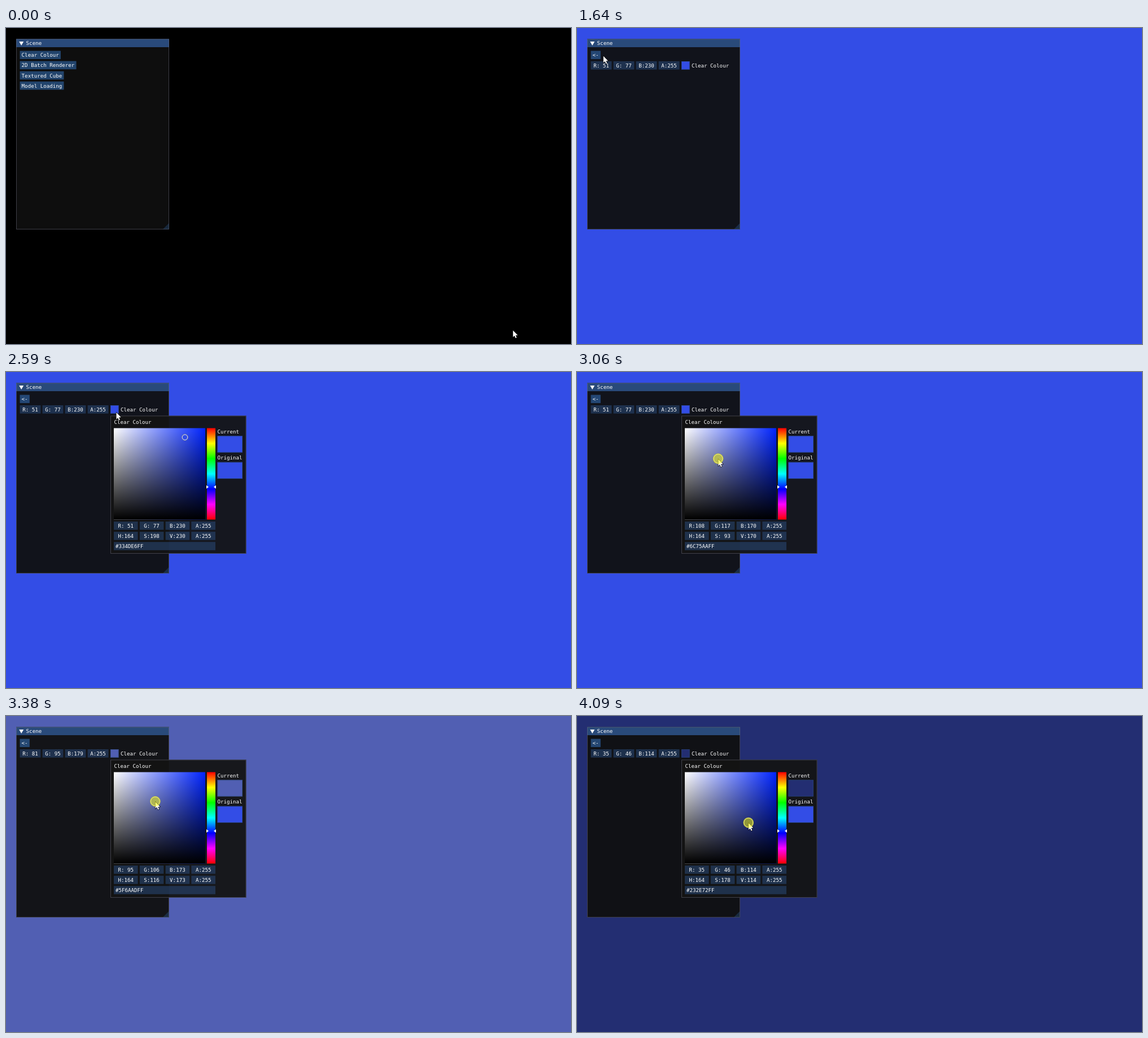
Recreate the animation shown at these times as an HTML page with a canvas. Size 1001 by 560 pixels, loop 4170 ms.

```html
<!DOCTYPE html>
<html>
<head>
<meta charset="utf-8">
<title>Scene</title>
<style>
html, body { margin: 0; width: 100%; height: 100%; overflow: hidden; background: #000; }
canvas { display: block; }
</style>
</head>
<body>
<canvas id="stage" width="1001" height="560"></canvas>
<script>
const ctx = document.getElementById('stage').getContext('2d');
const LOOP = 4170, STEP = 78.68, LAST = 52;
const CHAR = 5.515, ROW = 18.1, LINE = 14.6, GAP = 3.15;
const SV = { x: 191, y: 99.5, size: 162 };
const HUE = 4 - 1 / 7; // in sixths of the colour wheel
const START = { s: 0.7 / 0.9, v: 0.9 };

const BUTTON = 'rgba(66,150,250,.4)', ACTIVE = '#0f87fa';
const FIELD = 'rgba(41,74,122,.54)', BORDER = 'rgba(110,110,128,.5)';

// Steps at which something happens
const PRESS = 11, OPEN_SCENE = 14, HOVER = 28, PRESS_SWATCH = 30, OPEN_PICKER = 32, DRAG = 39;

// Places where the pointer turns or rests: step, x, y
const STOPS = [
  [0, 898, 535], [7, 43, 56], [8, 50, 44.5], [20, 50, 44.5], [22, 43, 53],
  [HOVER, 197, 59], [PRESS_SWATCH, 192, 66], [OPEN_PICKER, 192, 66],
  [DRAG, 250.1, 153.6], [41, 279.94, 147.8], [42, 279.94, 147.8],
  [44, 248.85, 154.77], [45, 248.9, 156.74], [48, 303.77, 188.93], [LAST, 303.77, 188.93]
];

function pointer(k) {
  const i = Math.max(1, STOPS.findIndex(stop => stop[0] >= k));
  const [k0, x0, y0] = STOPS[i - 1], [k1, x1, y1] = STOPS[i];
  const u = (k - k0) / (k1 - k0), e = u * u * (3 - 2 * u);
  return { x: x0 + (x1 - x0) * e, y: y0 + (y1 - y0) * e };
}

function picked(k) {
  if (k < DRAG) return START;
  const p = pointer(k);
  return { s: (p.x - SV.x) / SV.size, v: 1 - (p.y - SV.y) / SV.size };
}

function toRgb({ s, v }) {
  return [1 - s, 1 - s * (HUE - 3), 1].map(c => Math.round(c * v * 255 + 1e-6));
}

const css = rgb => `rgb(${rgb})`;
const hex = rgb => '#' + [...rgb, 255].map(c => c.toString(16).padStart(2, '0')).join('').toUpperCase();

function box(x, y, w, h, fill, border) {
  ctx.fillStyle = fill;
  ctx.fillRect(x, y, w, h);
  if (border) outline(x, y, w, h, border);
}

function outline(x, y, w, h, colour) {
  ctx.strokeStyle = colour;
  ctx.lineWidth = 1;
  ctx.strokeRect(x + .5, y + .5, w - 1, h - 1);
}

// y is the middle of the line
function text(str, x, y) {
  ctx.fillStyle = '#fff';
  ctx.fillText(str, x, y + 3.4);
}

function shape(fill, ...points) {
  ctx.fillStyle = fill;
  ctx.beginPath();
  points.forEach(([x, y]) => ctx.lineTo(x, y));
  ctx.closePath();
  ctx.fill();
}

function circle(x, y, r) {
  ctx.beginPath();
  ctx.arc(x, y, r, 0, 7);
}

function button(label, row, fill = BUTTON) {
  const y = 40.5 + row * ROW;
  box(24.5, y, label.length * CHAR + 6.3, LINE, fill);
  text(label, 27.6, y + 7.4);
}

// Four equal boxes from x to x + total
function fields(names, values, x, y, total) {
  const w = (total - 3 * GAP) / 4;
  values.forEach((value, i) => {
    const left = x + i * (w + GAP);
    const label = names[i] + ':' + String(value).padStart(3);
    box(left, y, w, LINE, FIELD);
    text(label, left + (w - label.length * CHAR) / 2, y + 7.4);
  });
}

function panel() {
  box(18, 19.4, 271, 337.6, 'rgba(15,15,15,.94)');
  box(18, 19.4, 271, 14.6, '#294a7a');
  outline(18, 19.4, 271, 337.6, BORDER);
  shape('#fff', [23.2, 24], [31.2, 24], [27.2, 31]);
  text('Scene', 35.6, 27);
  shape('rgba(66,150,250,.2)', [288.5, 346], [288.5, 356.5], [278, 356.5]);
}

function menu(k) {
  const labels = ['Clear Colour', '2D Batch Renderer', 'Textured Cube', 'Model Loading'];
  labels.forEach((label, i) => button(label, i, i == 0 && k > PRESS ? ACTIVE : BUTTON));
}

function colourRow(rgb) {
  button('<-', 0);
  fields('RGBA', [...rgb, 255], 24.5, 59, 157);
  box(185, 59, LINE, LINE, css(rgb), FIELD);
  text('Clear Colour', 203, 66.2);
}

function tooltip(x, y, rgb) {
  box(x, y, 209, 48, 'rgba(20,20,20,.94)', BORDER);
  box(x + 6, y + 6.5, 35.5, 35, css(rgb), FIELD);
  const [r, g, b] = rgb;
  const parts = [START.v * (1 - START.s), .3, START.v, 1].map(c => c.toFixed(3));
  const lines = [hex(rgb), `R:${r}, G:${g}, B:${b}, A:255`, `(${parts.join(', ')})`];
  lines.forEach((line, i) => text(line, x + 47.8, y + 14.3 + i * 10.3));
}

function gradient(x, y, w, h, dx, dy, colours) {
  const g = ctx.createLinearGradient(x, y, x + dx, y + dy);
  colours.forEach((c, i) => g.addColorStop(i / (colours.length - 1), c));
  box(x, y, w, h, g);
}

function picker(k, current) {
  const sv = picked(k), rgb = toRgb(sv);
  const { x, y, size } = SV;
  box(185, 77.4, 240.6, 244.6, 'rgba(20,20,20,.94)', BORDER);
  text('Clear Colour', 191.4, 88.5);
  gradient(x, y, size, size, size, 0, ['#fff', css(toRgb({ s: 1, v: 1 }))]);
  gradient(x, y, size, size, 0, size, ['rgba(0,0,0,0)', '#000']);
  gradient(356, y, 15, size, 0, size, ['#f00', '#ff0', '#0f0', '#0ff', '#00f', '#f0f', '#f00']);

  const hy = y + size * HUE / 6;
  shape('#fff', [355, hy - 3], [359, hy], [355, hy + 3]);
  shape('#fff', [372, hy - 3], [368, hy], [372, hy + 3]);

  const cx = x + sv.s * size, cy = y + (1 - sv.v) * size, r = k < DRAG ? 4.7 : 7.9;
  circle(cx, cy, r);
  ctx.fillStyle = css(rgb);
  ctx.fill();
  ctx.lineWidth = .8;
  ctx.strokeStyle = '#808080';
  circle(cx, cy, r + .8);
  ctx.stroke();
  ctx.strokeStyle = '#fff';
  circle(cx, cy, r);
  ctx.stroke();

  [['Current', current], ['Original', toRgb(START)]].forEach(([label, colour], i) => {
    const top = 105.3 + i * 46.5;
    text(label, 374.5, top);
    box(374.5, top + 8, 44.5, 29.3, css(colour), FIELD);
  });

  const hsv = [HUE / 6, sv.s, sv.v].map(c => Math.round(c * 255));
  fields('RGBA', [...rgb, 255], x, 265, 180);
  fields('HSVA', [...hsv, 255], x, 265 + ROW, 180);
  box(x, 265 + 2 * ROW, 180, LINE, FIELD);
  text(hex(rgb), x + 3, 272.5 + 2 * ROW);
}

function arrow({ x, y }) {
  ctx.save();
  ctx.translate(x + .3, y + 1);
  ctx.strokeStyle = '#000';
  ctx.lineWidth = 1.2;
  shape('#fff', [0, 0], [0, 11.8], [2.7, 9.3], [4.5, 13.6], [6.4, 12.8], [4.6, 8.6], [8.3, 8.4]);
  ctx.stroke();
  ctx.fill();
  ctx.restore();
}

function draw(time) {
  const k = Math.min(LAST, Math.floor((time % LOOP + 12.5) / STEP));
  const within = (from, to) => k >= from && k < to;
  const pos = pointer(k);
  const rgb = toRgb(picked(k - 1)); // the scene lags the picker by one step
  const inScene = k >= OPEN_SCENE;
  ctx.font = '9.16px "DejaVu Sans Mono", monospace';

  box(0, 0, 1001, 560, inScene ? css(rgb) : '#000');
  panel();
  if (inScene) colourRow(rgb); else menu(k);
  if (within(HOVER, OPEN_PICKER)) tooltip(Math.round(pos.x + 18.6), Math.round(pos.y + 1), rgb);
  if (k >= OPEN_PICKER) picker(k, rgb);
  arrow(pos);

  if (within(PRESS, OPEN_SCENE) || within(PRESS_SWATCH, OPEN_PICKER) || k >= DRAG - 1) {
    circle(pos.x, pos.y, 9.3);
    ctx.fillStyle = 'rgba(255,255,0,.5)';
    ctx.fill();
  }
}

const begin = performance.now();
function tick() {
  draw(performance.now() - begin);
  requestAnimationFrame(tick);
}
tick();
</script>
</body>
</html>
```
